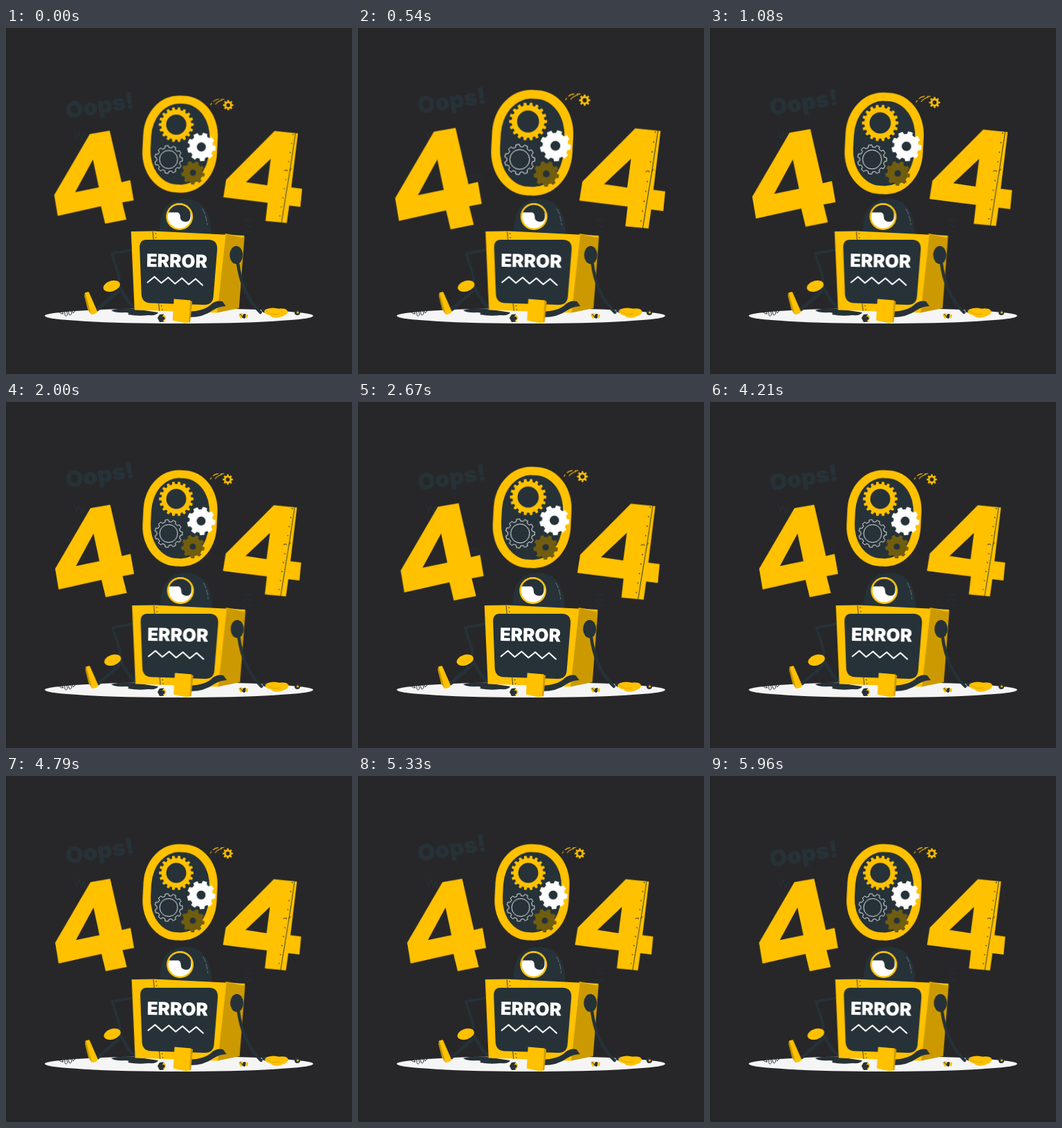
Recreate the animation shown at these times as an HTML page. Size 500x500 px, loop 6000 ms.

```html
<!DOCTYPE html>
<html lang="en">
<head>
<meta charset="utf-8">
<title>404</title>
<style>
  html, body { margin: 0; width: 100%; height: 100%; overflow: hidden; background: #272729; }
  svg { display: block; width: 100%; height: 100%; }
  text { font-family: Inter, "Open Sans", sans-serif; font-weight: 900; }
  .y { fill: #ffc100; }
  .d { fill: #263238; }
  .shade { fill: #cc9a00; }
  .w { fill: #fff; }
  .line { fill: none; stroke: #263238; stroke-linecap: round; stroke-linejoin: round; }

  #number, #robot, #oops { animation: 1.5s linear -45ms infinite; }
  #number { animation-name: beat; animation-duration: 6s; transform-origin: 248.5px 190.5px; }
  #robot { animation-name: shake; }
  #oops { animation-name: float; }

  @keyframes beat {
    0%, 30%, 40%, 60%, 100% { transform: scale(1); }
    10%, 50% { transform: scale(1.1); }
  }
  @keyframes shake {
    0%, 100% { transform: translateX(0); }
    10%, 90% { transform: translateX(-1px); }
    20%, 80% { transform: translateX(2px); }
    30%, 50%, 70% { transform: translateX(-4px); }
    40%, 60% { transform: translateX(4px); }
  }
  @keyframes float {
    0%, 100% { transform: translateY(0); }
    50% { transform: translateY(-10px); }
  }
</style>
</head>
<body>
<svg viewBox="0 0 500 500">
  <g id="oops"><text class="d" font-size="33" transform="translate(88 132) rotate(-9)">Oops!</text></g>

  <g class="line" stroke-width="1">
    <path d="M98 148l4 12 3-10 4 11 3-10 4 10"/>
    <path d="M164 213q7-4 8 0t7-1M165 219q6-4 8 0t7-1"/>
    <path d="M344 280q6-6 7-2t6-2M344 288q6-6 7-2t6-2M344 296q6-6 7-2t6-2"/>
  </g>

  <!-- floor -->
  <ellipse cx="250" cy="416" rx="194" ry="11" fill="#f5f5f5"/>
  <path class="d" d="M152 408q14-4 34-2l34 5q-2 5-14 4-16 2-30-1 4-3-4-3-14 1-20-3z"/>
  <path class="line" stroke-width="1" d="M76 410q3 4 7 3c-6-6 2-6 2 0s6 2 3-2 3-2 3 2 6 1 3-3 3-1 3 2l4-4"/>

  <g id="number">
    <path class="y" fill-rule="evenodd" d="M122 153.5L150.5 148.500 167.500 222.500 180 219.500 185 248.500 168.500 251.500 174.500 276 144 282 138 257 76 271 71 241zM126.500 190L101 237 135 230z"/>
    <path class="y" fill-rule="evenodd" d="M387 149L420.500 152.500 411 230 426.500 232 424 258 408 256 404.500 281 374 278 377 252 313.500 244 317.500 219zM381.500 189L346 222.500 376.500 227z"/>
    <path class="line" stroke-width=".9" d="M417 152.500L409 206 404 236 397 280M409 206l2-3M401 206l3-1"/>
    <g id="rivets" class="d"></g>

    <g transform="rotate(3 251.500 168)">
      <rect class="y" x="198" y="98.500" width="107" height="139" rx="50" ry="58"/>
      <rect class="d" x="209.500" y="110" width="84" height="116" rx="39" ry="49"/>
    </g>
    <g id="gears"></g>
    <path fill="none" stroke="#ffc100" stroke-width="1" d="M295 112l2-3M299 107q3-3 8-3.500M302 111q4-5 10-6M310 104l5-.5"/>
  </g>

  <g id="robot">
    <!-- left arm and leg -->
    <path class="line" stroke-width="4" d="M186 320L153 326 164 360 162 372"/>
    <path class="line" stroke-width="5" d="M190 405Q180 402 173 389L164 374M162 381L132 407"/>
    <ellipse class="y" cx="153" cy="373" rx="12.500" ry="7.500" transform="rotate(-18 153 373)"/>
    <path class="shade" d="M114 383l5-2 4 33z"/>
    <path class="y" d="M114.500 382.500l5.500-1 12.500 28.500q-3 4-9 4z"/>
    <path class="shade" d="M114 383l9.500 31-5-7-5-20z"/>

    <!-- head -->
    <path class="d" d="M222 298Q220 247 259 247 296 247 297 299z"/>
    <path d="M284 261q6 10 7 24" fill="none" stroke="#78848a" stroke-width=".8" stroke-dasharray="9 2"/>
    <circle class="y" cx="251" cy="272.500" r="19.500"/>
    <circle class="w" cx="251" cy="272.500" r="17"/>
    <path class="d" d="M235 266.500A17 17 0 0 1 266.800 266.500zM248 266h18.500q2 14-6.500 14-8 0-8-8 0-4-4-6z"/>

    <!-- body -->
    <path class="shade" d="M317 297L345 301.500 337 405 305 411.500z"/>
    <path class="y" d="M181 294L214 293.500 345 300 343 303 318 298 305.500 411.500 186 407.500z"/>
    <path class="d" d="M203 306L293 306Q306 306 305.500 320L300 388Q299 400 287 400L209 397.500Q197 397 196 385L193.500 318Q193 306 203 306z"/>
    <path class="line" stroke-width=".9" d="M212.500 294.500L213.500 306M221 398L222 408.500"/>
    <g class="d">
      <circle cx="216.500" cy="297" r=".8"/><circle cx="217" cy="303" r=".8"/>
      <circle cx="225" cy="401.500" r=".8"/><circle cx="226" cy="407" r=".8"/>
    </g>
    <text class="w" font-size="26" transform="translate(203 345) rotate(1)">ERROR</text>
    <path id="zigzag" fill="none" stroke="#fff" stroke-width="2.200" stroke-linecap="round" stroke-linejoin="round"/>

    <!-- right arm -->
    <ellipse class="d" cx="333" cy="328" rx="9.500" ry="13"/>
    <path class="line" stroke-width="4.500" d="M335 338Q341 385 368 411"/>
    <path class="d" d="M369 406l6-1v7l-5-2z"/>
    <ellipse class="y" cx="386" cy="410" rx="12.500" ry="5.500"/>
    <ellipse class="y" cx="394.500" cy="412" rx="13" ry="6.300" transform="rotate(-12 394 412)"/>
    <path d="M375 408q8 8 20 5" fill="none" stroke="#cc9a00" stroke-width=".7"/>

    <!-- right leg -->
    <path class="d" d="M262 410Q288 409 297 399 304 393 313 395L318 402Q308 402 299 408 286 418 264 418z"/>
    <path class="y" d="M243 391.500L267 393.500 265.500 424Q264 427 257 426L241 422.500z"/>
    <path class="shade" d="M266.500 394l3 1-3 30-2 1z"/>
  </g>

  <!-- loose parts -->
  <path class="y" d="M219 419l3-5 6-.5 3.500 5-3 6-6 .5z"/>
  <path class="d" d="M222 414l6-.5-3 5 3 6-6 .5-3-6z"/>
  <circle class="d" cx="227" cy="419.500" r="2.500"/>
  <path class="y" d="M336 414l5-2 3 6-5 2zM342 414l8 0-1 5-6 0z"/>
  <path class="d" d="M338 413l5 6M343 414l3-.5-1 6-3-1z" stroke="#263238"/>
  <circle class="d" cx="421" cy="411" r="4"/>
  <circle class="y" cx="421.500" cy="411" r="1.500"/>
</svg>
<script>
  const byId = id => document.getElementById(id);
  const circle = (x, y, r) => `M${x - r} ${y}a${r} ${r} 0 1 0 ${2 * r} 0a${r} ${r} 0 1 0 ${-2 * r} 0z`;

  function gear(x, y, r, depth, teeth, hole, paint, turn = 0) {
    const points = [];
    for (let i = 0; i < teeth; i++) {
      for (const [part, radius] of [[-.3, r - depth], [-.2, r], [.2, r], [.3, r - depth]]) {
        const a = (i + part) / teeth * 2 * Math.PI + turn;
        points.push(`${(x + radius * Math.cos(a)).toFixed(2)} ${(y + radius * Math.sin(a)).toFixed(2)}`);
      }
    }
    return `<path fill-rule="evenodd" stroke-linejoin="round" ${paint} d="M${points.join('L')}z${circle(x, y, hole)}"/>`;
  }

  byId('gears').innerHTML =
    gear(246, 140, 25, 3.5, 18, 14.5, 'fill="#ffc100"') +
    gear(270, 209, 17, 3, 9, 4.5, 'fill="#705d10"', .2) +
    gear(235, 190, 20, 3, 11, 13, 'fill="none" stroke="#fff" stroke-width=".9"') +
    gear(282, 172, 20, 3.5, 9, 7, 'fill="#fff" stroke="#fff"', .1) +
    gear(320.5, 112, 7.5, 2, 8, 2.8, 'fill="#ffc100"');

  byId('rivets').innerHTML = Array.from({ length: 10 }, (_, i) =>
    `<circle cx="${413.5 - i * 2.1}" cy="${154 + i * 13}" r=".8"/>`).join('');

  byId('zigzag').setAttribute('d', 'M' + Array.from({ length: 9 }, (_, i) =>
    `${205 + i * 9.9} ${367.5 + i * .5 - (i % 2) * 8.5}`).join('L'));
</script>
</body>
</html>
```
